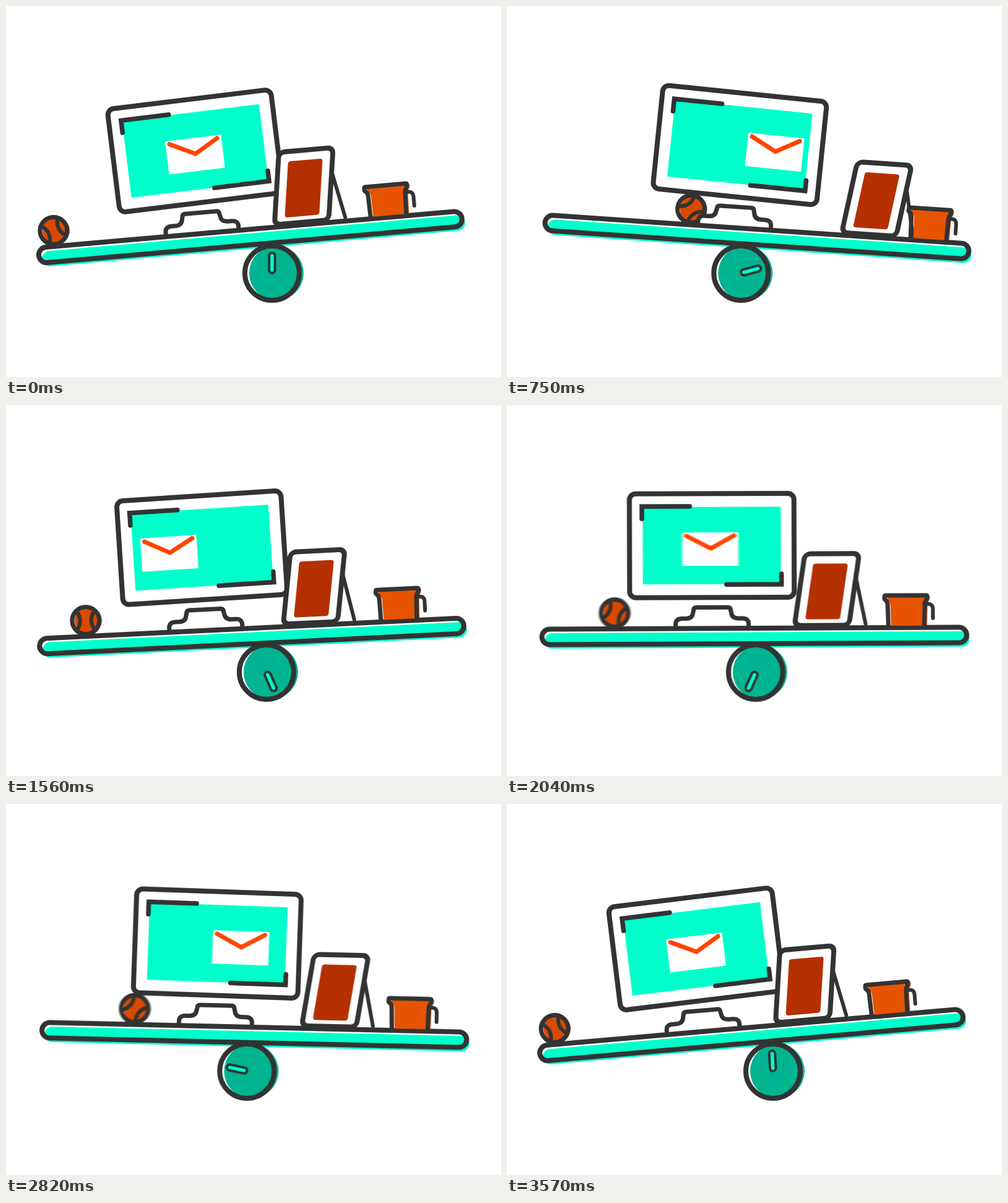
An HTML page with a canvas for the animation above (3.6 s loop, 800 by 600 pixels).

```html
<!DOCTYPE html>
<html>
<head>
<meta charset="utf-8">
<title>Balancing desk</title>
<style>
  html, body { margin: 0; height: 100%; overflow: hidden; background: #fff; }
  canvas { display: block; }
</style>
</head>
<body>
<canvas id="stage" width="800" height="600"></canvas>
<script>
const LOOP = 3600, STEP = 30, SHUTTER = 15, SAMPLES = 8, LAG = 8;
const INK = '#333', CYAN = '#00ffcc', TEAL = '#00b491', WHITE = '#fff';
const BALL = '#d94a00', MUG = '#e65400', PHOTO = '#b53000', FLAP = '#ff4500';

// One value per quarter of the loop; loose things follow the board with a small lag
const driven = {
  tilt: [-5, 4, -3, 2],
  wheel: [430, 377.7, 422.3, 385],
  sway: [-2, 2, -1, 1],
  mail: [-1, 57.8, -56.5, 42.3]
};
const loose = {
  ball: [-316, -106.8, -272, -183.4],
  spin: [-21, 56, 0, 45],
  monitor: [-76.7, -37.2, -74.7, -62],
  frame: [84.5, 181.5, 93, 123.5],
  mug: [225.3, 277.4, 237.5, 253.2]
};

const stage = document.getElementById('stage').getContext('2d');
const buffer = document.createElement('canvas');
buffer.width = 800;
buffer.height = 600;
const ctx = buffer.getContext('2d');

const box = (cx, cy, w, h, r = 0) => {
  const p = new Path2D();
  p.roundRect(cx - w / 2, cy - h / 2, w, h, r);
  return p;
};
const disc = r => {
  const p = new Path2D();
  p.arc(0, 0, r, 0, 2 * Math.PI);
  return p;
};

const board = box(0, -57.5, 686.6, 25, 12.5);
const wheel = disc(44), pill = box(0, -16.5, 9.5, 33, 4.75);
const ball = disc(22), seams = new Path2D('M-15-16Q-3 0-15 16M15-16Q3 0 15 16');
const stand = new Path2D('M-59-1Q-60-12-49-12H-43Q-32-12-31-21L-30-25Q-30-30-25-30' +
  'H25Q30-30 30-25L31-21Q32-12 43-12H49Q60-12 59-1');
const bezel = box(0, 0, 266, 168, 10), screen = box(0, 0, 223, 125);
const brackets = new Path2D('M-113-43.5V-63.5H-35.5M112.5 46V63H23.5');
const letter = box(0, 0, 91, 54), flap = new Path2D('M-39-21.5L1-1L38.5-22');
const frame = box(0, -58, 88, 116, 9), photo = box(0, -55, 56, 90, 4);
const cup = new Path2D('M-29 0L-30-33Q-30-38-33-40Q-36-42-35-46Q-35-48-33-48' +
  'H32Q34-48 34-46Q34-42 31-38Q30-36 30-33L29 0');
const handle = new Path2D('M33-34Q43-35 43-26V-11'), leg = new Path2D('M52-95L71-2');

function ease(x) {
  let lo = 0, hi = 1;
  for (let i = 0; i < 24; i++) {
    const u = (lo + hi) / 2;
    if (u * (1 - u) ** 2 + u ** 3 < x) lo = u; else hi = u;
  }
  return lo * lo * (3 - 2 * lo);
}

function poseAt(t, keys) {
  const q = (t + LOOP) % LOOP / LOOP * 4, i = Math.floor(q), e = ease(q - i), pose = {};
  for (const name in keys) {
    const k = keys[name], a = k[i], b = k[(i + 1) % 4];
    pose[name] = a + (b - a) * e;
  }
  return pose;
}

function place(x, y, degrees, draw) {
  ctx.save();
  ctx.translate(x, y);
  ctx.rotate(degrees * Math.PI / 180);
  draw();
  ctx.restore();
}

function fill(path, color, dx = 0, dy = 0) {
  ctx.save();
  ctx.translate(dx, dy);
  ctx.fillStyle = color;
  ctx.fill(path);
  ctx.restore();
}

function line(path, width, color = INK, join = 'round') {
  ctx.lineWidth = width;
  ctx.strokeStyle = color;
  ctx.lineJoin = join;
  ctx.stroke(path);
}

function drawMonitor(p) {
  fill(stand, WHITE);
  line(stand, 7);
  place(0, -130, p.sway, () => {
    fill(bezel, WHITE);
    line(bezel, 8);
    fill(screen, CYAN);
    line(brackets, 7.5, INK, 'miter');
    place(p.mail, 5.7, 0, () => {
      fill(letter, WHITE);
      line(flap, 7, FLAP, 'miter');
    });
  });
}

function drawFrame() {
  line(leg, 6);
  ctx.transform(1, 0, -0.149, 1, 0, 0);
  fill(frame, WHITE);
  line(frame, 8);
  fill(photo, PHOTO);
}

function drawScene(t) {
  const p = { ...poseAt(t, driven), ...poseAt(t - LAG, loose) };
  ctx.fillStyle = WHITE;
  ctx.fillRect(0, 0, 800, 600);
  ctx.lineCap = 'round';

  place(400, 431, p.tilt, () => {
    fill(board, CYAN, 4.5, 6.5);
    line(board, 8);
    place(p.ball, -95.5, 0, () => {
      fill(ball, BALL, 4, 0);
      place(0, 0, p.spin, () => line(seams, 6));
      line(ball, 7);
    });
    place(p.monitor, -74, 0, () => drawMonitor(p));
    place(p.frame, -74, 0, drawFrame);
    place(p.mug, -74, 0, () => {
      fill(cup, MUG, 4.5, 1);
      line(cup, 7);
      line(handle, 6);
    });
  });

  place(p.wheel, 432, 0, () => {
    fill(wheel, TEAL, 7, 0);
    line(wheel, 8);
    place(0, 0, t / LOOP * 360, () => {
      fill(pill, CYAN);
      line(pill, 4);
    });
  });
}

// Averages several moments around t for motion blur
function render(t) {
  for (let i = 0; i < SAMPLES; i++) {
    drawScene(t + ((i + 0.5) / SAMPLES - 0.5) * SHUTTER);
    stage.globalAlpha = 1 / (i + 1);
    stage.drawImage(buffer, 0, 0);
  }
}

let start, shown;
function tick(now) {
  start ??= now;
  const t = Math.floor((now - start) % LOOP / STEP) * STEP;
  if (t !== shown) render(shown = t);
  requestAnimationFrame(tick);
}
requestAnimationFrame(tick);
</script>
</body>
</html>
```
